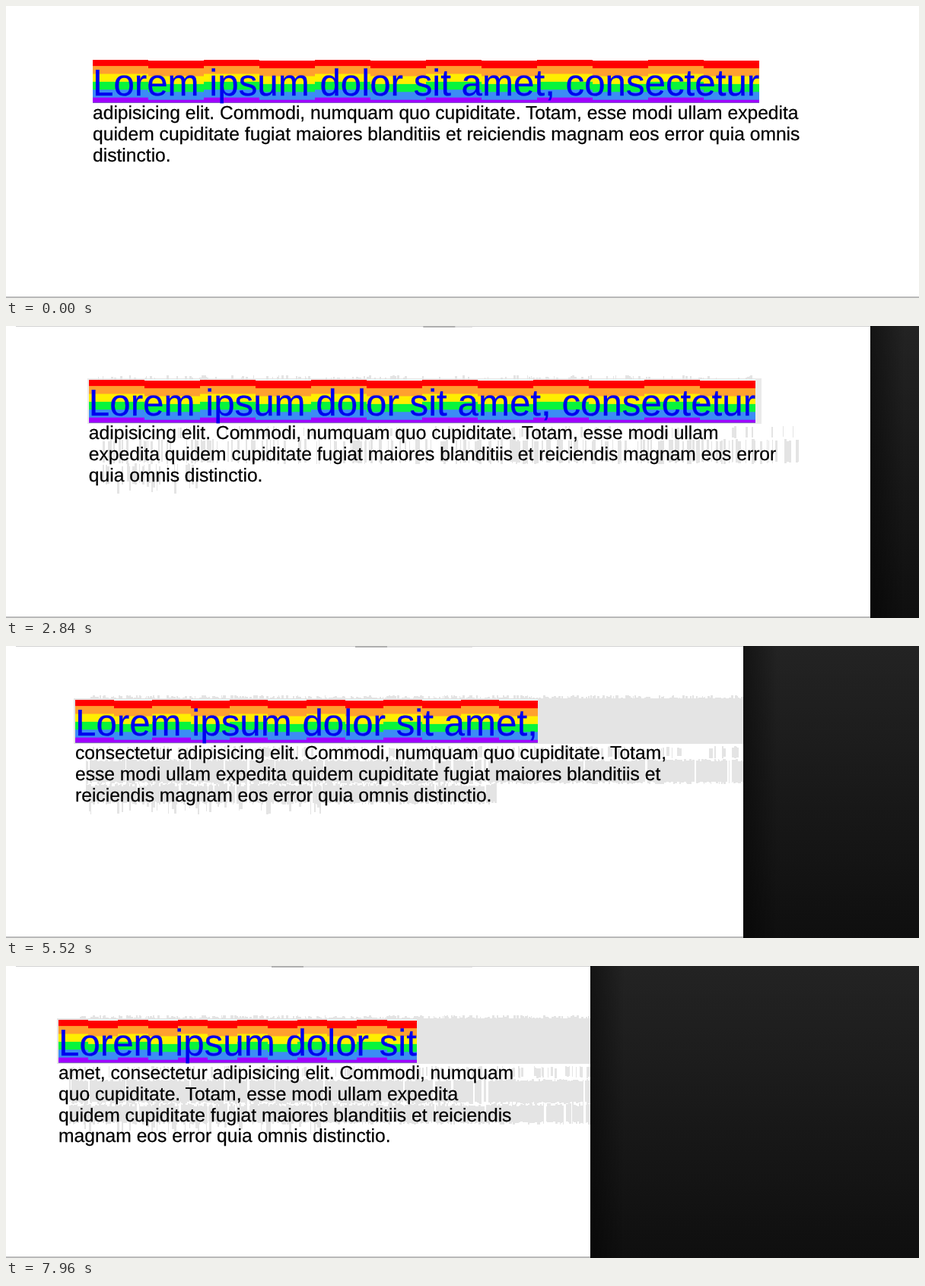
Recreate the animation shown at these times as an HTML page with a canvas. Size 1200 by 385 pixels, loop 8 s.

```html
<!DOCTYPE html>
<html lang="la">
<head>
<meta charset="utf-8">
<title>First line</title>
<style>
  html, body { margin: 0; width: 1200px; height: 385px; overflow: hidden; background: #fff; }
  canvas, svg { position: absolute; left: 0; top: 0; display: block; }
  text {
    font: 24.63px "Liberation Sans", Arial, Helvetica, sans-serif;
    text-rendering: geometricPrecision;
    fill: #000;
    stroke: #000;
    stroke-width: .25px;
  }
  text.first { font-size: 49.27px; fill: #00e; stroke: #00e; }
</style>
</head>
<body>
<canvas id="page" width="1200" height="385"></canvas>
<svg id="copy" width="1200" height="385" viewBox="0 0 1200 385"></svg>
<script>
const LOOP = 8000, STEP = 40;
const BIG = 49.27, SMALL = 24.63, LEADING = 27.7;
const GREY = '#e4e4e4';
const STRIPES = ['#f00', '#ffa02f', '#ffee00', '#08f53c', '#3c8cf5', '#a000ff'];
const WORDS = ('Lorem ipsum dolor sit amet, consectetur adipisicing elit. Commodi, numquam quo ' +
  'cupiditate. Totam, esse modi ullam expedita quidem cupiditate fugiat maiores blanditiis et ' +
  'reiciendis magnam eos error quia omnis distinctio.').split(' ');

// [time, value] pairs
const LEFT = [[0, 114], [1000, 113.6], [2200, 112.3], [3560, 105], [4760, 95.6],
  [5080, 92.5], [5520, 91], [6600, 84], [7960, 69]];
const EDGE = [[0, 1212], [1000, 1200], [2200, 1163], [3560, 1106], [4760, 982],
  [5520, 969], [6600, 894], [7560, 838], [7960, 768]];
const REACH = [[0, 216], [2800, 216], [3000, 394], [4100, 394], [4300, 643],
  [5900, 643], [6100, 766], [8000, 766]];

const ctx = document.getElementById('page').getContext('2d');
const svg = document.getElementById('copy');

const lineEls = Array.from({ length: 6 }, (_, i) => {
  const el = document.createElementNS('http://www.w3.org/2000/svg', 'text');
  el.setAttribute('y', i ? 149.3 + (i - 1) * LEADING : 117.5);
  if (!i) el.setAttribute('class', 'first');
  svg.append(el);
  return el;
});

function track(keys, t) {
  let i = 1;
  while (i < keys.length - 1 && keys[i][0] < t) i++;
  const [t0, a] = keys[i - 1], [t1, b] = keys[i];
  return a + (b - a) * Math.min(1, (t - t0) / (t1 - t0));
}

let seed = 7;
function rand() {
  seed = (seed * 16807) % 2147483647;
  return seed / 2147483647;
}

// Ragged smears left behind by the reflowing text
const smears = [];
function smear(from, to, y, h, density, rag, third) {
  for (let x = from; x < to;) {
    const w = 1 + Math.floor(rand() * 3);
    const up = Math.floor(rand() * rag), down = Math.floor(rand() * rag);
    const born = 1800 + 2700 * rand();
    if (rand() < density) smears.push({ x, y: y - up, w, h: h + up + down, born, third });
    x += w;
  }
}
smear(96, 985, 68, 2, 0.7, 4);
smear(80, 1042, 135, 10, 0.35, 4);
smear(80, 1042, 152, 27, 0.95, 4);
smear(80, 768, 185, 20, 0.95, 5, true);
smear(80, 430, 205, 6, 0.2, 12, true);

const widths = new Map();
function textWidth(str, size) {
  if (!widths.has(str)) {
    ctx.font = '1000px "Liberation Sans", Arial, Helvetica, sans-serif';
    widths.set(str, ctx.measureText(str).width / 1000);
  }
  return widths.get(str) * size;
}

function wrap(limit) {
  const lines = [];
  let line = '';
  for (const word of WORDS) {
    const next = line ? line + ' ' + word : word;
    if (line && textWidth(next, lines.length ? SMALL : BIG) > limit) {
      lines.push(line);
      line = word;
    } else line = next;
  }
  return lines.concat(line);
}

function box(x, y, w, h, fill) {
  ctx.fillStyle = fill;
  ctx.fillRect(x, y, w, h);
}

function drawSmears(t, left) {
  ctx.globalAlpha = Math.max(0, Math.min(1, (t - 1000) / 2400));
  box(left - 2, 69, 995 - left, 60, GREY);
  ctx.globalAlpha = 1;
  const reach = track(REACH, t);
  for (const s of smears) {
    if (t > s.born && s.x > left + 12 && !(s.third && s.x > reach)) box(s.x, s.y, s.w, s.h, GREY);
  }
}

function drawRainbow(left, width) {
  const seg = width / 12;
  box(left, 71, width, 57, '#fff');
  for (let i = 0; i < 12; i++) {
    const low = i % 2;
    const x0 = Math.round(left + i * seg), x1 = Math.round(left + (i + 1) * seg);
    STRIPES.forEach((color, k) => {
      const top = k ? 68.7 + 10.4 * k + 3 * low : 71 + low;
      box(x0, top, x1 - x0, 127.5 - top, color);
    });
  }
}

function drawTopEdge(t, left, edge) {
  if (t < 1000) return;
  const mid = 5 * (left + 7) - 10;
  box(13, 0, edge - 13, 1, '#d2d2d2');
  box(mid, 0, Math.max(22, 613 - mid), 2, '#dcdcdc');
  box(mid - 21, 0, 42, 2, '#b0b0b0');
}

function drawPanel(edge) {
  if (edge >= 1200) return;
  const shade = ctx.createLinearGradient(0, 0, 0, 385);
  shade.addColorStop(0, '#232323');
  shade.addColorStop(1, '#0f0f0f');
  box(edge, 0, 1200 - edge, 385, shade);
  const shadow = ctx.createLinearGradient(edge, 0, edge + 45, 0);
  shadow.addColorStop(0, 'rgba(0,0,0,.45)');
  shadow.addColorStop(1, 'rgba(0,0,0,0)');
  box(edge, 0, 45, 385, shadow);
}

function draw(now) {
  const t = Math.floor((now % LOOP) / STEP) * STEP;
  const left = track(LEFT, t);
  const edge = Math.round(track(EDGE, t));
  const lines = wrap(8 * left + 53);

  box(0, 0, 1200, 385, '#fff');
  drawSmears(t, left);
  drawRainbow(left, textWidth(lines[0], BIG));
  drawTopEdge(t, left, edge);
  box(0, 383.5, 1200, 1, '#777');
  drawPanel(edge);

  lineEls.forEach((el, i) => {
    el.setAttribute('x', left);
    const str = lines[i] || '';
    if (el.textContent !== str) el.textContent = str;
  });
}

function loop() {
  draw(performance.now());
  requestAnimationFrame(loop);
}
loop();
</script>
</body>
</html>
```
